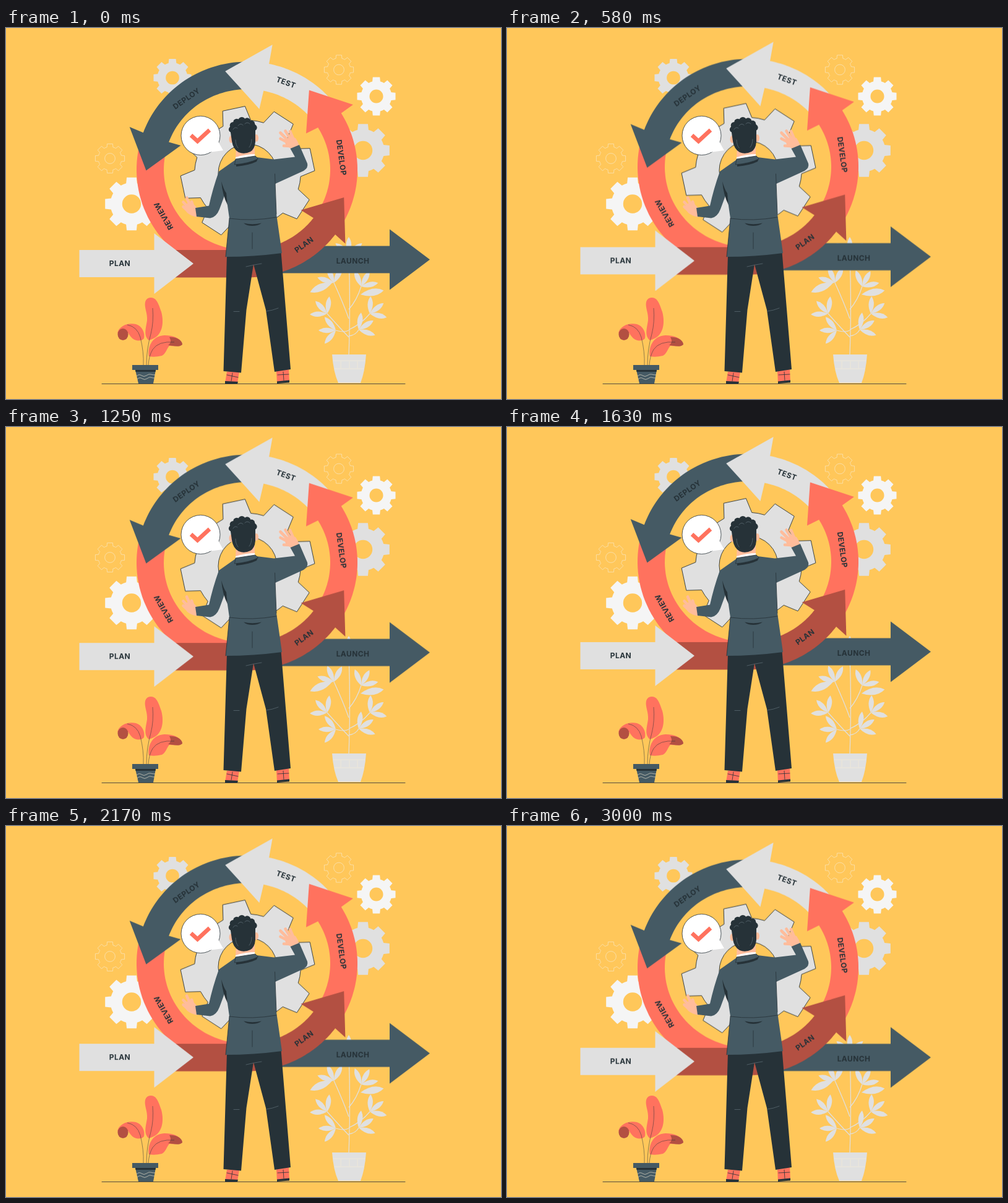
An HTML page for the animation above (3.04 s loop, 800 by 600 pixels).

```html
<!DOCTYPE html>
<html lang="en">
<head>
<meta charset="utf-8">
<title>Product cycle</title>
<style>
  html, body { margin: 0; width: 100%; height: 100%; overflow: hidden; background: #ffc75a; }
  svg { display: block; width: 800px; height: 600px; }
  #cycle { animation: float 3040ms linear infinite; }
  @keyframes float { 50% { transform: translateY(-12px); } }
  .dark { fill: #263238; }
  .slate { fill: #455a64; }
  .grey { fill: #e0e0e0; }
  .pale { fill: #f5f5f5; }
  .white { fill: #fff; }
  .coral { fill: #ff725e; }
  .brick { fill: #b35042; }
  .skin { fill: #ffbc9b; }
  .fingers { fill: none; stroke: #ffbc9b; stroke-width: 4.6; stroke-linecap: round; }
  .line { fill: none; stroke: #263238; stroke-width: .8; stroke-linecap: round; }
  .vein { fill: none; stroke: #263238; stroke-width: .5; }
  .faint { fill: none; stroke: #f7edd6; stroke-width: .6; }
  .soft { fill: none; stroke: #607079; stroke-width: .7; stroke-linecap: round; }
  .twig { fill: none; stroke: #e0e0e0; stroke-width: 1.2; }
  text { font: 700 12px Inter, "Open Sans", sans-serif; letter-spacing: .4px; fill: #263238; text-anchor: middle; }
</style>
</head>
<body>
<svg viewBox="0 0 800 600">
  <g id="gears"></g>
  <path class="line" d="M155 575.5H645"/>

  <g id="bush"></g>
  <path class="grey" d="M527 528H582Q580 556 573 574H537Q529 556 527 528Z"/>
  <path class="faint" d="M529 538H580M531 551H578M541 539V550M555 539V550M568 539V550"/>

  <g id="pot-plant">
    <path class="coral" d="M234 436C244 436 247 448 251 459C256 478 253 500 231 505C222 498 226 486 228 473C229 461 223 452 225 443Q227 436 234 436Z"/>
    <path class="coral" d="M180 494C182 482 197 476 210 479C220 482 225 493 223 502Q219 507 210 505C201 503 199 492 191 487Z"/>
    <ellipse class="brick" cx="189" cy="495.500" rx="8.500" ry="9.500"/>
    <path class="coral" d="M231 531C228 518 235 498 256 497C270 497 280 501 284 509C281 516 270 514 264 514C260 518 259 526 252 530Q240 533 231 531Z"/>
    <path class="brick" d="M264 500C276 499 285 505 285 512C280 517 270 514 262 513Q269 508 264 500Z"/>
    <path class="vein" d="M237 453Q239 475 234 495Q227 520 227 545M196 480Q212 483 217 500Q223 524 222 545M272 508Q246 506 237 520Q231 530 230 545"/>
    <path class="slate" d="M204 545H246V553H204ZM209 553H242L238 575H214Z"/>
    <path class="dark" d="M209 553H242L241.500 556H209.500Z"/>
    <path class="faint" d="M211 563q4-4 8-1t8 0t7-2t7 1M212 568q4-4 8-1t8 0t6-2t6 1"/>
  </g>

  <g id="cycle">
    <g id="cog" stroke="#263238" stroke-width=".9"></g>
    <g id="ring"></g>
    <text x="184" y="385">PLAN</text>
    <text x="560.500" y="381">LAUNCH</text>
    <text transform="translate(452.500 88) rotate(20)" y="4.300">TEST</text>
    <text transform="translate(542 209.500) rotate(82)" y="4.300">DEVELOP</text>
    <text transform="translate(291.500 114) rotate(-35)" y="4.300">DEPLOY</text>
    <text transform="translate(254.500 304) rotate(-120)" y="4.300">REVIEW</text>
    <text transform="translate(481.500 350.500) rotate(-36)" y="4.300">PLAN</text>
  </g>

  <g id="bubble">
    <circle class="white" cx="314.500" cy="174" r="31.500" stroke="#263238" stroke-width=".8"/>
    <path class="white" d="M328 201L351 198L342 182L320 180Z"/>
    <path d="M299 173.500L309.500 183L329 165" fill="none" stroke="#ff725e" stroke-width="6.500"/>
  </g>

  <g id="man">
    <path class="coral" d="M357 556H377L374 574H354ZM437 555L457 552L458 572L438 574Z"/>
    <path class="dark" d="M354 571L375 572L374 575.500H354ZM438 571.500L458 569.500V573.500L438 575Z"/>
    <path class="line" d="M357 561L375 565M366 558L364 571M439 561L457 560M448 556L449 570"/>
    <path class="dark" d="M357 367L444.500 362L460 552L434 556L420 456L400 382L388.500 456L380 557.500L351.500 555Z"/>
    <path class="soft" d="M388 386Q400 383 413 381M368 458.500H377M421 458Q430 457 440 453"/>

    <path class="skin" d="M309 306Q299 304 293 299L287 291L291 284L301 283L308 290Z"/>
    <path class="fingers" d="M294 296L286.500 289M295 291L286.500 281.500M298 288L292 274.500M303 291L300 281"/>
    <path class="skin" d="M460 195L452 189L450 181L460 176L468 178Q472 184 474 190Z"/>
    <path class="fingers" d="M457 183L443.500 169.500M460 180L451.500 166.500M465 181L459 167M457 186L443.500 179M459 191L449 190.500"/>

    <path class="skin" d="M372 192H402V207L388 214L371 211Z"/>
    <ellipse class="skin" cx="364" cy="180" rx="3.500" ry="6"/>
    <ellipse class="skin" cx="404.500" cy="178" rx="3.500" ry="6"/>
    <path class="slate" d="M371 213L388 216L405 209L433 212.500L467 208.500L459.500 195L474 189L487 219Q489 226 481 231L435 252L437 301L446 364Q400 370 355 370L361 308L355 266L345 293Q340 306 330 307.500L308 305L306 291L328 287.500Q334 260 344 232Z"/>
    <path class="white" d="M371 209Q388 204 402 204L403 210L371 215Z"/>
    <path class="dark" d="M372 219Q392 217 407 211L405 216Q393 222 372 224Z"/>
    <path class="slate" stroke="#263238" stroke-width=".8" d="M371 212Q389 209 403 207L407.500 211.500Q393 219 369.500 221Z"/>
    <path class="line" d="M434.500 236L437 301M361 308Q398 313 437 306M398 331V357M361 308L355 370"/>
    <path class="dark" d="M384 315.500Q398 319 413 315.500Q407 320 398 320Q389 320 384 315.500ZM348 248Q352 262 356 267L358 286Q350 271 348 248Z"/>

    <path class="dark" d="M362 162Q384 145 403 156L403 184Q402 196 395 200Q385 205 376 201Q367 196 365 183Z"/>
    <g id="curls"></g>
    <path class="soft" d="M367 164q3-5 7-2M375 158q4-5 8-1M386 155q4-4 8 0M371 181q0 8 4 13M397 180q0 8-4 13"/>
  </g>
</svg>
<script>
  const NS = "http://www.w3.org/2000/svg";
  const $ = id => document.getElementById(id);

  function add(parent, tag, attrs) {
    const el = document.createElementNS(NS, tag);
    for (const key in attrs) el.setAttribute(key, attrs[key]);
    $(parent).appendChild(el);
  }
  const path = (parent, name, d) => add(parent, "path", { class: name, d, "fill-rule": "evenodd" });

  // Point at a clockwise angle in degrees.
  const polar = (cx, cy, rx, deg, ry = rx) => {
    const a = deg * Math.PI / 180;
    return [cx + rx * Math.cos(a), cy + ry * Math.sin(a)];
  };
  const shape = points => "M" + points.map(p => p.map(n => n.toFixed(1)).join(" ")).join("L") + "Z";

  // Eight-toothed gear with a round hole.
  function gear(parent, name, cx, cy, r, { root, hole, turn, tip, base }) {
    const outline = [];
    for (let a = turn; a < turn + 360; a += 45) {
      outline.push(polar(cx, cy, r * root, a - base), polar(cx, cy, r, a - tip),
        polar(cx, cy, r, a + tip), polar(cx, cy, r * root, a + base));
      outline.push(polar(cx, cy, r * root, a + 22.5));
    }
    const h = r * hole;
    path(parent, name, shape(outline) + `M${cx - h} ${cy}a${h} ${h} 0 1 0 ${2 * h} 0a${h} ${h} 0 1 0 ${-2 * h} 0Z`);
  }

  gear("cog", "grey", 390.5, 235, 108.5, { root: .79, hole: .438, turn: -12, tip: 9.8, base: 15.5 });

  const small = { root: .79, hole: .35, turn: 0, tip: 10.5, base: 15 };
  gear("gears", "grey", 269, 80.5, 31, small);
  gear("gears", "faint", 538, 67.5, 24, small);
  gear("gears", "pale", 598.5, 110.5, 31.5, small);
  gear("gears", "grey", 577, 198, 43.5, small);
  gear("gears", "faint", 168, 211, 24, small);
  gear("gears", "pale", 203, 284.5, 43.5, small);

  // Ring band between two angles, with an optional head { tip, out, inn } at its end.
  function band(name, from, to, head) {
    const cx = 389.5, cy = 229, outer = [], inner = [];
    for (let i = 0; i <= 40; i++) {
      const a = from + (to - from) * i / 40;
      outer.push(polar(cx, cy, 178.5, a, 174.5));
      inner.unshift(polar(cx, cy, 134.5, a, 130));
    }
    const point = head
      ? [polar(cx, cy, head.out, to), polar(cx, cy, 163, head.tip), polar(cx, cy, head.inn, to)]
      : [];
    path("ring", name, shape([...outer, ...point, ...inner]));
  }

  // Straight arrow pointing right.
  const arrow = (name, x, y, neck, tip) => path("ring", name, shape([
    [x, y - 22], [neck, y - 22], [neck, y - 49], [tip, y], [neck, y + 49], [neck, y + 22], [x, y + 22]
  ]));

  band("coral", -168, -270);
  band("slate", -92, -160, { tip: -180.5, out: 202, inn: 114 });
  band("grey", -38, -78.5, { tip: -102.5, out: 206, inn: 100 });
  band("coral", 30, -31.5, { tip: -52, out: 201, inn: 112 });
  arrow("slate", 440, 374.5, 620, 685);
  band("brick", 90, 37, { tip: 16, out: 199, inn: 109 });
  path("ring", "brick", "M270 359H390V403.500H270Z");
  arrow("grey", 118.5, 381, 239.5, 303);

  function leaf(x, y, deg, len) {
    const [u, v] = polar(x, y, len, deg);
    const [a, b] = polar(x, y, len * .66, deg - 27);
    const [c, d] = polar(x, y, len * .66, deg + 27);
    path("bush", "grey", `M${x} ${y}Q${a} ${b} ${u} ${v}Q${c} ${d} ${x} ${y}Z`);
  }

  // Each branch leaves the trunk at (554, y) and fans out three leaves at its end.
  function branch(y, x1, y1) {
    const deg = Math.atan2(y1 - y, x1 - 554) * 180 / Math.PI;
    path("bush", "twig", `M554 ${y}Q${(554 + x1) / 2 + 3} ${(y + y1) / 2 + 4} ${x1} ${y1}`);
    for (const spread of [-50, 0, 50]) leaf(x1, y1, deg + spread, 28);
  }
  branch(528, 554, 366);
  branch(470, 530, 412);
  branch(500, 519, 462);
  branch(489, 533, 489);
  branch(455, 574, 418);
  branch(488, 588, 462);
  branch(498, 570, 488);
  leaf(573, 431, -10, 38);
  leaf(528, 411, 156, 40);

  // Curls along the top of the head.
  for (let i = 0; i < 7; i++) {
    const [cx, cy] = polar(383, 164, 18, 180 + i * 28, 14);
    add("curls", "circle", { class: "dark", cx, cy, r: 6 - Math.abs(i - 3) * .3 });
  }
</script>
</body>
</html>
```
